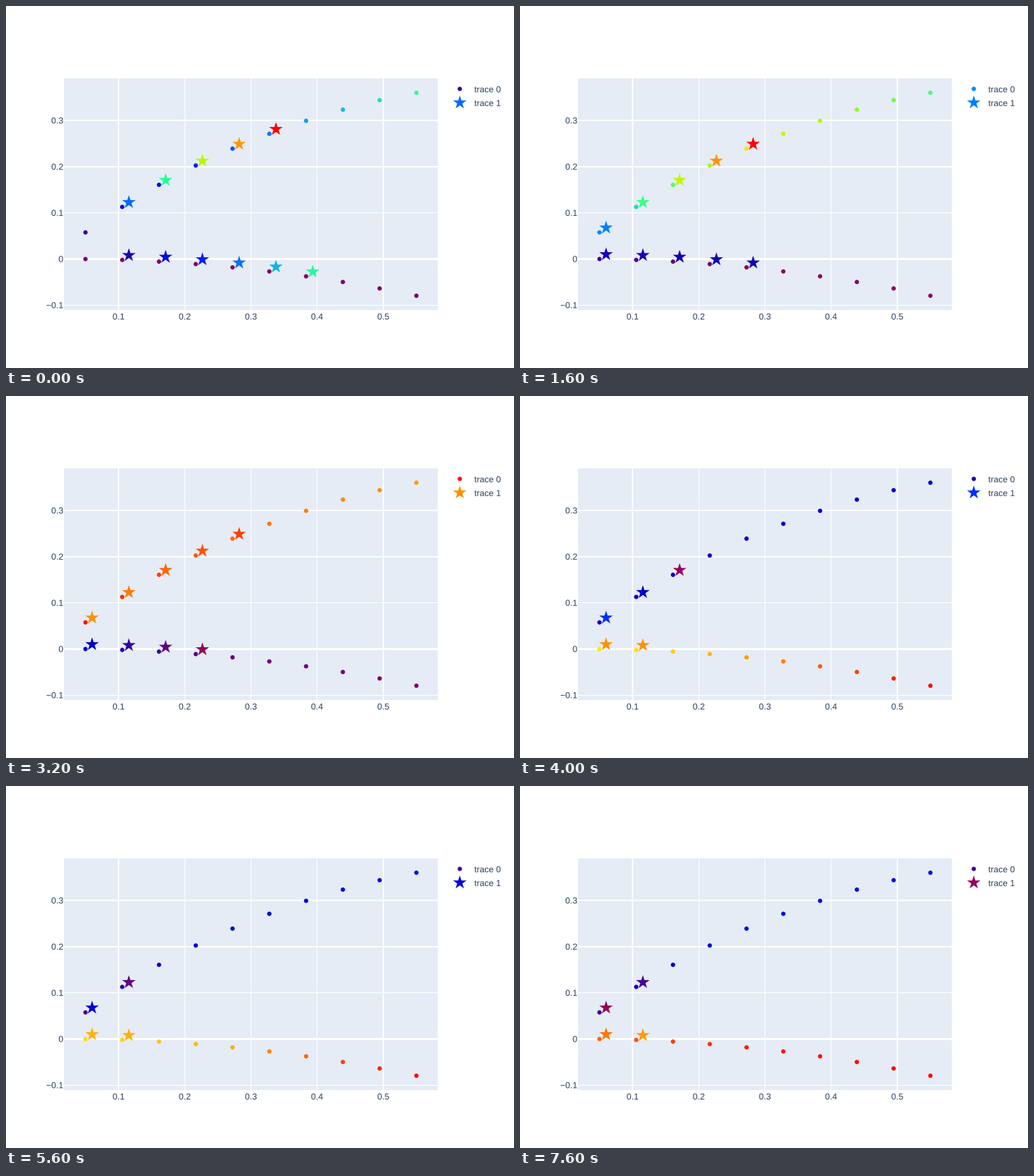
A matplotlib script for the animation above (8 s loop, 700 px wide and 500 px high).

```python
import numpy as np
import matplotlib.pyplot as plt
from matplotlib.animation import FuncAnimation
from matplotlib.collections import PolyCollection
from matplotlib.colors import LinearSegmentedColormap
from matplotlib.patches import PathPatch, Rectangle
from matplotlib.textpath import TextPath
from matplotlib.transforms import Affine2D

plt.rcParams["font.family"] = "Liberation Sans"

W, H, DPI = 700, 500, 100
FRAMES, INTERVAL = 20, 400
LEFT, TOP, RIGHT, BOTTOM = 80, 100, 595, 420
ZERO_Y, UNIT_Y = 349.4, 63.77
LEGEND_X = 625.3
INK = "#2a3f5f"
RAINBOW = LinearSegmentedColormap.from_list("rainbow9", [
    "#96005a", "#0000c8", "#0019ff", "#0098ff", "#2cff96",
    "#97ff00", "#ffea00", "#ff6f00", "#ff0000"], N=1024)

# A rising and a falling row of dots; each star sits up and right of its dot.
STEP = np.arange(10)
DOT_X = 109.5 + STEP * 456 / 9
RISE = np.polyfit([0, 1, 4, 6, 9], [312.7, 277.5, 197, 158.6, 119.75], 4)
ROWS = [np.polyval(RISE, STEP), 349.5 + 0.668 * STEP + 0.5517 * STEP ** 2]
STAR_DX, STAR_DY = 9.12, -6.39


class Pose:
    """Colour levels at one moment: dots as (start, middle, end) of each row,
    stars as ranges (first index, last index, first level, last level)."""

    def __init__(self, dots, stars):
        self.dots = [np.interp(STEP, [0, 4, 9], row) for row in dots]
        self.stars = [np.interp(STEP, r[:2], r[2:]) for r in stars]
        self.shown = [np.arange(r[0], r[1] + 1) for r in stars]


POSES = {
    0: Pose([(.08, .31, .5), (.03, .01, .03)], [(1, 5, .33, 1), (1, 6, .1, .49)]),
    4: Pose([(.36, .73, .53), (.08, .01, 0)], [(0, 4, .35, 1), (0, 4, .11, .11)]),
    8: Pose([(.98, .88, .83), (.12, .04, .02)], [(0, 4, .84, .93), (0, 3, .13, 0)]),
    10: Pose([(.1, .13, .13), (.73, .83, 1)], [(0, 2, .27, 0), (0, 1, .84, .84)]),
    16: Pose([(.04, .16, .23), (.78, .8, 1)], [(0, 1, .08, 0), (0, 1, .79, .79)]),
    19: Pose([(.08, .18, .2), (.89, .97, 1)], [(0, 1, 0, .07), (0, 1, .87, .83)]),
}


def pose_at(frame):
    """Neighbouring poses mixed linearly; the nearer one decides which stars show."""
    before = max(t for t in POSES if t <= frame)
    after = min(t for t in POSES if t >= frame)
    mix = (frame - before) / max(after - before, 1)
    a, b = POSES[before], POSES[after]
    dots = [(1 - mix) * p + mix * q for p, q in zip(a.dots, b.dots)]
    stars = [(1 - mix) * p + mix * q for p, q in zip(a.stars, b.stars)]
    return dots, stars, (a if mix <= 0.5 else b).shown


def star_shape(x, y, radius=9.8):
    angle = np.arange(10) * np.pi / 5
    r = np.where(np.arange(10) % 2, 0.382, 1) * radius
    return np.column_stack([x + r * np.sin(angle), y - r * np.cos(angle)])


fig = plt.figure(figsize=(W / DPI, H / DPI), dpi=DPI, facecolor="white")
ax = fig.add_axes([0, 0, 1, 1])
ax.set(xlim=(0, W), ylim=(H, 0))
ax.axis("off")


def box(x0, y0, x1, y1, color):
    ax.add_patch(Rectangle((x0, y0), x1 - x0, y1 - y0, fc=color, lw=0, zorder=0))


def pixel_span(center, width):
    """Whole pixels that a line covers to a good part."""
    return (np.floor(center - width / 2 + 0.35),
            np.ceil(center + width / 2 - 0.35))


def label(x, baseline, text, anchor=0.0):
    """Text whose width is shifted left by the anchor fraction."""
    path = TextPath((0, 0), text, size=12)
    width = path.get_extents().x1 + 0.5
    place = Affine2D().scale(1, -1).translate(x - anchor * width, baseline)
    ax.add_patch(PathPatch(place.transform_path(path), fc=INK, lw=0, snap=False))


box(LEFT, TOP, RIGHT, BOTTOM, "#e5ecf6")
for n in range(1, 6):
    x = 155.1 + (n - 1) * 91.2
    x0, x1 = pixel_span(x, 1)
    box(x0, TOP, x1, BOTTOM, "white")
    label(x, 433, f"0.{n}", 0.5)

for n in range(-1, 4):
    y = ZERO_Y - UNIT_Y * n
    y0, y1 = pixel_span(y, 1 if n else 2)
    box(LEFT, y0, RIGHT, y1, "white")
    text = f"{n / 10:.1f}".replace("-", "\u2212") if n else "0"
    label(79, y + 4.2, text, 1)

label(645.3, 119.2, "trace 0")
label(645.3, 138.2, "trace 1")

dots = ax.scatter([], [], s=(6 * 72 / DPI) ** 2, lw=0, zorder=3)
stars = PolyCollection([], linewidths=0, zorder=4)
ax.add_collection(stars, autolim=False)


def draw(frame):
    dot_levels, star_levels, shown = pose_at(frame)
    points, shapes, tones = [], [], []
    for row, ys in enumerate(ROWS):
        points += list(zip(DOT_X, ys))
        for i in shown[row]:
            shapes.append(star_shape(DOT_X[i] + STAR_DX, ys[i] + STAR_DY))
            tones.append(star_levels[row][i])

    # Legend symbols take the colour of the first point of each trace.
    points.append((LEGEND_X, 114.5))
    shapes.append(star_shape(LEGEND_X, 133.5))
    tones.append(tones[0])

    dots.set_offsets(points)
    dots.set_facecolor(RAINBOW(np.concatenate([*dot_levels, dot_levels[0][:1]])))
    stars.set_verts(shapes)
    stars.set_facecolor(RAINBOW(np.array(tones)))
    return dots, stars


anim = FuncAnimation(fig, draw, frames=FRAMES, interval=INTERVAL,
                     repeat=True, repeat_delay=0, blit=False)
plt.show()
```
